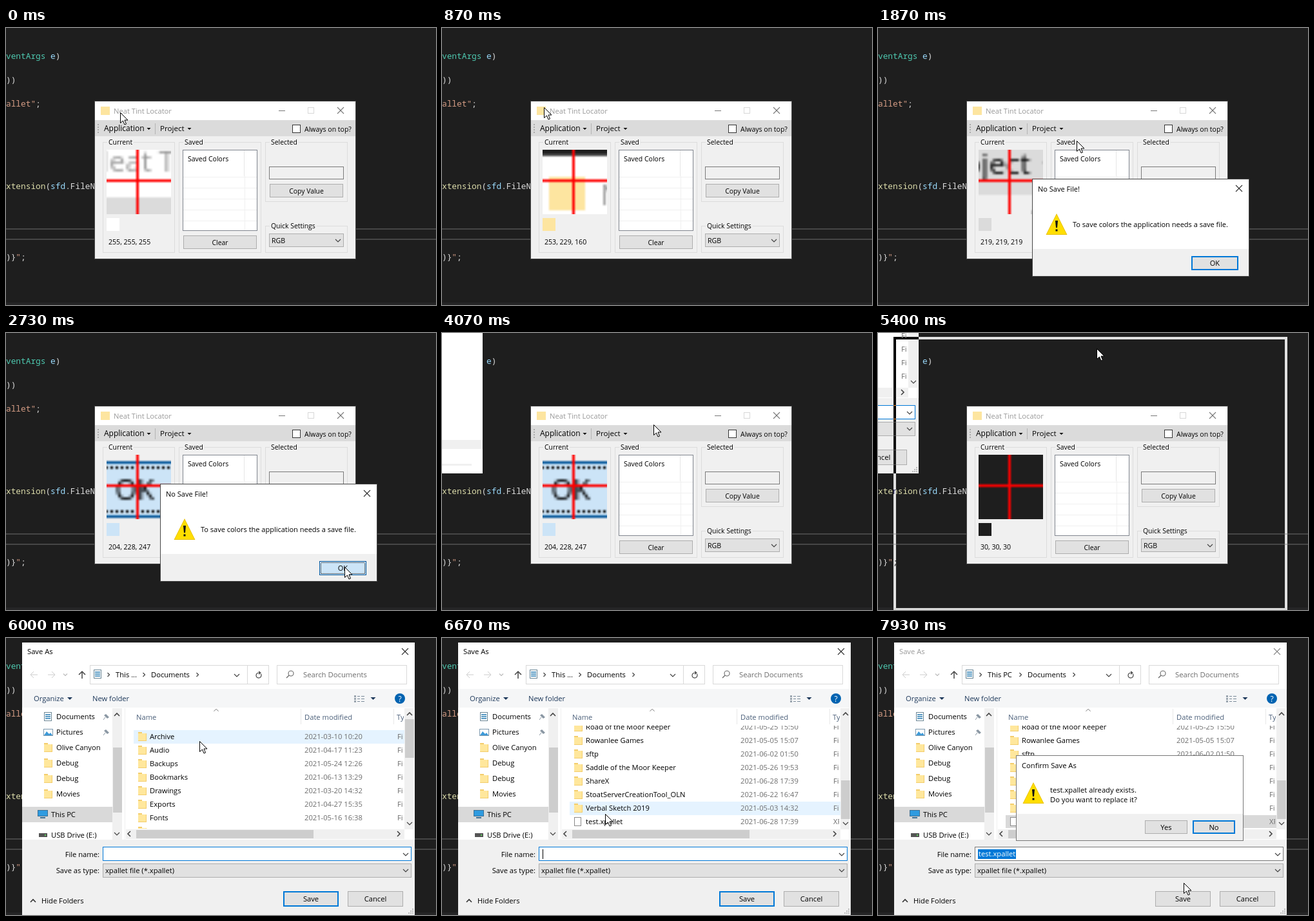
An HTML page with a canvas that plays this animation: 667 by 430 pixels, repeating every 8000 ms.

```html
<!DOCTYPE html>
<html lang="en">
<head>
<meta charset="utf-8">
<title>Colour picker</title>
<style>
html, body { margin: 0; width: 100%; height: 100%; overflow: hidden; background: #1e1e1e; }
canvas { display: block; }
</style>
</head>
<body>
<canvas id="stage" width="667" height="430"></canvas>
<script>
const LOOP = 8000;
const main = document.getElementById('stage').getContext('2d');
const buffer = document.createElement('canvas');
buffer.width = buffer.height = 27;
const probe = buffer.getContext('2d', { willReadFrequently: true });
let g = main;

const UI = '"Open Sans", "Noto Sans", sans-serif';
const MONO = '"Noto Sans Mono", "DejaVu Sans Mono", monospace';
const BLUE = '#0078d7', PANEL = '#f0f0f0', GREY = '#e1e1e1', EDGE = '#adadad';

// Pointer path: time, x, y
const path = [
  [-70, 188, 136], [0, 177, 131], [70, 177, 131], [200, 165, 124], [400, 165, 124],
  [500, 160, 123], [670, 160, 123], [800, 158, 123], [1600, 158, 123], [2000, 380, 200],
  [2350, 526, 355], [2470, 526, 355], [2660, 525, 363], [3450, 525, 363], [4070, 328, 142],
  [4200, 294, 123], [4265, 294, 123], [4320, -232, -188], [4870, -232, -188], [5330, 339, 24],
  [5660, 339, 24], [6000, 300, 160], [6200, 300, 160], [6600, 253, 273], [6720, 253, 273],
  [7000, 262, 284], [7070, 262, 284], [7400, 474, 408], [7660, 474, 408], [7930, 474, 380]
];

function pointer(t) {
  const i = path.findIndex(k => k[0] > t);
  if (i < 0) return path[path.length - 1].slice(1);
  if (i === 0) return path[0].slice(1);
  const [a, b] = [path[i - 1], path[i]];
  const p = (t - a[0]) / (b[0] - a[0]);
  return [a[1] + (b[1] - a[1]) * p, a[2] + (b[2] - a[2]) * p];
}

function box(x, y, w, h, fill, edge, lw = 1) {
  if (fill) { g.fillStyle = fill; g.fillRect(x, y, w, h); }
  if (edge) {
    g.strokeStyle = edge; g.lineWidth = lw;
    g.strokeRect(x + lw / 2, y + lw / 2, w - lw, h - lw);
  }
}

function text(s, x, y, size = 11.2, color = '#000', align = 'left', font = UI) {
  g.font = `${size}px ${font}`;
  g.fillStyle = color;
  g.textAlign = align;
  g.fillText(s, x, y);
}

function line(pts, color, w = 1) {
  g.beginPath();
  for (let i = 0; i < pts.length; i += 2) g.lineTo(pts[i], pts[i + 1]);
  g.strokeStyle = color; g.lineWidth = w;
  g.stroke();
}

function shape(pts, color) {
  g.beginPath();
  for (let i = 0; i < pts.length; i += 2) g.lineTo(pts[i], pts[i + 1]);
  g.closePath();
  g.fillStyle = color;
  g.fill();
}

function clipped(x, y, w, h, draw) {
  g.save();
  g.beginPath(); g.rect(x, y, w, h); g.clip();
  draw();
  g.restore();
}

const down = (x, y, r = 4, c = '#444') => line([x - r, y - r / 2, x, y + r / 2, x + r, y - r / 2], c, 1.2);
const up = (x, y, r = 4, c = '#444', w = 1.2) => line([x - r, y + r / 2, x, y - r / 2, x + r, y + r / 2], c, w);
const right = (x, y, r = 3, c = '#444', w = 1.2) => line([x - r / 2, y - r, x + r / 2, y, x - r / 2, y + r], c, w);
const left = (x, y) => line([x + 2, y - 4, x - 2, y, x + 2, y + 4], '#444', 1.6);
const drop = (x, y, r, c) => shape([x - r, y - r / 2, x + r, y - r / 2, x, y + r / 2], c);

function cross(x, y, c = '#333') {
  line([x - 5, y - 5, x + 5, y + 5], c, 1.1);
  line([x + 5, y - 5, x - 5, y + 5], c, 1.1);
}

function button(s, x, y, w, h, { fill = GREY, edge = EDGE, lw = 1, size = 11.2 } = {}) {
  box(x, y, w, h, fill, edge, lw);
  text(s, x + w / 2, y + h / 2 + 4, size, '#000', 'center');
}

function warning(x, y) {
  shape([x + 16, y, x + 32.5, y + 33, x - .5, y + 33], '#e8c000');
  shape([x + 16, y + 2, x + 31, y + 32, x + 1, y + 32], '#ffde00');
  shape([x + 14, y + 11, x + 18, y + 11, x + 17, y + 22, x + 15, y + 22], '#111');
  box(x + 14.5, y + 24.5, 3, 3, '#111');
}

function editor() {
  box(-900, -700, 2400, 1800, '#1e1e1e');
  const W = '#dcdcdc', V = '#9cdcfe', S = '#d69d85';
  const rows = [
    [48, 'ventArgs', '#4ec9b0', ' e', V, ')', W],
    [85, '))', W],
    [122, 'allet"', S, ';', W],
    [250, 'xtension', '#dcdcaa', '(', W, 'sfd', V, '.FileN', W],
    [360, ')}', W, '"', S, ';', W]
  ];
  for (const [y, ...parts] of rows) {
    let x = 0;
    for (let i = 0; i < parts.length; i += 2) {
      text(parts[i], x, y, 12.8, parts[i + 1], 'left', MONO);
      x += g.measureText(parts[i]).width;
    }
  }
  box(0, 311, 667, 2, '#464646');
  box(0, 327, 667, 2, '#464646');
  box(0, 426, 667, 4, '#252526');
}

function group(s, x, y, w, h) {
  box(x, y, w, h, null, '#dcdcdc');
  g.font = `10.4px ${UI}`;
  box(x + 7, y - 4, g.measureText(s).width + 4, 9, PANEL);
  text(s, x + 9, y + 4, 10.4);
}

function picker(lens) {
  box(137, 113, 406, 246, PANEL, '#484848');
  box(138, 114, 404, 29, '#fff');
  box(138, 143, 404, 25, '#dbdbdb');
  box(147, 122, 14, 13, '#fde5a0');
  text('Neat Tint Locator', 167, 133, 11.2, '#999');
  line([423, 128.5, 433, 128.5], '#777');
  box(468, 123, 10, 10, null, '#d8d8d8');
  cross(519, 128, '#777');

  for (let y = 149; y < 165; y += 4) box(142, y, 2, 2, '#aaa');
  text('Application', 152, 160, 12);
  drop(221.5, 156.5, 3, '#000');
  line([231.5, 148, 231.5, 165], '#b4b4b4');
  text('Project', 239, 160, 11.6);
  drop(284.5, 156.5, 3, '#000');
  box(444, 150, 13, 13, '#fff', '#333');
  text('Always on top?', 463, 161, 10.5);

  group('Current', 150, 177, 112, 172);
  group('Saved', 268, 177, 128, 172);
  group('Selected', 402, 177, 128, 93);
  group('Quick Settings', 402, 307, 128, 42);

  box(156, 189, 100, 100, '#fff');
  if (lens) {
    clipped(156, 189, 100, 100, () => g.drawImage(buffer, 154, 187, 108, 108));
    box(156, 295, 20, 20, `rgb(${lens})`);
    text(lens.join(', '), 159, 336, 10.6);
  }

  box(274, 189, 116, 126, '#fff', '#828790');
  for (let y = 231; y < 310; y += 17) box(275, y, 114, 1, '#f0f0f0');
  box(369, 190, 1, 40, '#e5e5e5');
  box(370, 230, 1, 84, '#f0f0f0');
  text('Saved Colors', 282, 207, 10.5);
  button('Clear', 275, 322, 114, 21, { size: 10.4 });
  box(408, 215, 116, 20, PANEL, '#7a7a7a');
  button('Copy Value', 409, 242, 114, 21, { size: 10.4 });
  box(408, 319, 116, 21, GREY, EDGE);
  text('RGB', 412, 334, 10.6);
  down(515, 330);
}

function message(t) {
  box(240, 235, 335, 150, '#fff');
  box(240, 343, 335, 42, PANEL);
  box(239, 234, 337, 152, null, '#484848');
  text('No Save File!', 248, 254, 11);
  cross(560, 249);
  warning(261, 288);
  text('To save colors the application needs a save file.', 302, 309, 11);
  const pressed = t >= 2600, hover = t >= 2330;
  box(486, 354, 73, 22, pressed ? '#cce4f7' : hover ? '#e5f1fb' : GREY,
    pressed ? '#005499' : BLUE, hover ? 1 : 2);
  if (pressed) {
    for (let x = 489; x < 557; x += 2) {
      box(x, 356, 1, 1, '#000');
      box(x, 373, 1, 1, '#000');
    }
    for (let y = 358; y < 373; y += 2) {
      box(488, y, 1, 1, '#000');
      box(556, y, 1, 1, '#000');
    }
  }
  text('OK', 514.8, 369, 11);
}

function folder(x, y) {
  box(x, y - 7, 6, 3, '#f3cd6c');
  box(x, y - 5, 13, 12, '#ffe79c');
  box(x + 12, y - 5, 1, 12, '#f3cd6c');
  box(x, y + 6, 13, 1, '#f3cd6c');
}

function page(x, y) {
  box(x, y - 7, 11, 14, '#fff', '#8a8a8a');
}

function doc(x, y) {
  box(x, y - 7, 12, 14, '#fff', '#6b8796');
  for (let i = -4; i < 5; i += 3) box(x + 2, y + i, 8, 2, '#5c9cc5');
}

const older = ['Archive', 'Audio', 'Backups', 'Bookmarks', 'Drawings', 'Exports', 'Fonts',
  'Invoices', 'Letters', 'Notes', 'Projects', 'Recordings'];
const files = [
  ...older.map((name, i) => [name, `2021-0${3 + i % 4}-${10 + i * 7 % 18} 1${i % 9}:${20 + i * 3}`]),
  ['Road of the Moor Keeper', '2021-05-25 15:50'],
  ['Rowanlee Games', '2021-05-05 15:07'],
  ['sftp', '2021-06-02 01:50'],
  ['Saddle of the Moor Keeper', '2021-05-26 19:53'],
  ['ShareX', '2021-06-28 17:39'],
  ['StoatServerCreationTool_OLN', '2021-06-22 16:47'],
  ['Verbal Sketch 2019', '2021-05-03 14:32'],
  ['test.xpallet', '2021-06-28 17:39']
];

function fileList(t) {
  const notches = Math.max(0, Math.min(5, Math.floor((t - 6200) / 66)));
  const scroll = Math.min(267, notches * 63);
  const [cx, cy] = pointer(t);
  const inside = t > 5660 && t < 7600 && cx > 196 && cx < 618 && cy > 136 && cy < 296;
  up(326, 112, 3.5, '#777', 1);
  text('Name', 202, 127, 11.2, '#4c607a');
  text('Date modified', 463, 127, 11.2, '#4c607a');
  clipped(600, 110, 17, 24, () => text('Type', 606, 127, 11.2, '#4c607a'));
  for (const x of [457, 601]) box(x, 110, 1, 24, '#e8e8e8');
  clipped(186, 136, 432, 160, () => files.forEach(([name, date], i) => {
    const y = 153 + i * 21 - scroll, last = i === files.length - 1;
    const hot = inside && Math.abs(cy - y) <= 10.5;
    if (last && t >= 7000) box(198, y - 10, 420, 20, t < 7670 ? '#cce8ff' : '#d9d9d9');
    else if (hot) box(198, y - 10, 420, 21, '#e5f3ff');
    if (last) page(205, y); else folder(205, y);
    text(name, 223, y + 4);
    text(date, 463, y + 4, 11.2, '#6d6d6d');
    clipped(600, y - 10, 16, 21, () =>
      text(last ? 'XPALLET' : 'File folder', 607, y + 4, 11.2, '#6d6d6d'));
  }));
  box(618, 109, 15, 188, PANEL);
  up(626, 118, 4, '#444', 1.6);
  down(626, 288);
  box(619, 126 + scroll / 267 * 95, 14, 60, '#cdcdcd');
  box(186, 297, 432, 15, PANEL);
  left(191, 304);
  right(609, 304, 4, '#444', 1.6);
  box(202, 298, 275, 13, '#cdcdcd');
}

function tree() {
  clipped(25, 109, 140, 204, () => {
    doc(59, 122);
    text('Documents', 78, 126);
    box(58, 141, 15, 11, '#fff', '#7a97ad');
    shape([59, 151, 63, 145, 67, 149, 69, 147, 72, 151], '#3d9ad8');
    text('Pictures', 78, 150);
    ['Olive Canyon', 'Debug', 'Debug', 'Movies'].forEach((s, i) => {
      folder(59, 170 + i * 24);
      text(s, 78, 174 + i * 24);
    });
    for (const y of [122, 146]) {
      shape([155, y - 4, 160, y + 1, 157, y + 3, 152, y - 2], '#8a97a3');
      line([154, y + 1, 151, y + 5], '#8a97a3');
    }
    box(25, 262, 140, 24, '#d9d9d9');
    box(49, 267, 16, 10, '#2f9be0', '#3c6f94');
    box(53, 278, 8, 2, '#3c6f94');
    text('This PC', 70, 278);
    box(51, 303, 13, 6, '#555');
    box(60, 305, 2, 2, '#5fd35f');
    text('USB Drive (E:)', 70, 310);
  });
  box(165, 109, 15, 204, PANEL);
  up(172, 119, 4, '#444', 1.6);
  down(172, 304);
  box(166, 170, 14, 101, '#cdcdcd');
  box(184, 109, 1, 204, '#f0f0f0');
}

function saveTop(t) {
  const idle = t >= 7600;
  text('Save As', 33, 25, 11.2, idle ? '#999' : '#000');
  cross(619, 21, idle ? '#888' : '#333');
  line([49, 57, 38, 57], '#ccc');
  line([43, 52, 38, 57, 43, 62], '#ccc');
  line([65, 57, 76, 57], '#ccc');
  line([71, 52, 76, 57, 71, 62], '#ccc');
  down(92, 57, 3, '#bbb');
  line([118, 63, 118, 52], '#444', 1.5);
  line([113, 57, 118, 52, 123, 57], '#444', 1.5);
  box(130, 42, 278, 30, '#fff', '#d9d9d9');
  box(374, 42, 1, 30, '#d9d9d9');
  doc(136, 56);
  const shift = idle ? 7 : 0;
  right(159, 57);
  text(idle ? 'This PC' : 'This ...', 170, 61);
  right(214 + shift, 57);
  text('Documents', 225 + shift, 61);
  right(297 + shift, 57);
  down(358, 58);
  g.beginPath();
  g.arc(392, 58, 4, -.6, 4.6);
  g.strokeStyle = '#555'; g.lineWidth = 1.3; g.stroke();
  shape([392, 51, 396, 54, 392, 57], '#555');
  box(420, 42, 202, 30, '#fff', '#d9d9d9');
  g.beginPath();
  g.arc(442, 55, 4, 0, 7);
  g.strokeStyle = '#666'; g.lineWidth = 1.1; g.stroke();
  line([439, 58, 435, 62], '#666', 1.2);
  text('Search Documents', 461, 61, 11.3, '#6d6d6d');

  box(25, 79, 609, 29, '#f5f6f7');
  text('Organize', 43, 98, 11.2, '#1e395b');
  drop(99, 94, 4, '#1e395b');
  text('New folder', 134, 98, 11.2, '#1e395b');
  for (let y = 89; y < 100; y += 4) {
    box(540, y, 3, 3, '#9aa5af');
    box(545, y + 1, 4, 1, '#7a8a99');
    box(551, y + 1, 5, 1, '#7a8a99');
  }
  drop(569.5, 94, 4, '#1e395b');
  g.beginPath();
  g.arc(611, 94, 8, 0, 7);
  g.fillStyle = '#0063b1'; g.fill();
  text('?', 611, 98.5, 12, '#fff', 'center');
  tree();
  fileList(t);
}

function saveForm(t) {
  const picked = t >= 7070, idle = t >= 7670;
  text('File name:', 145, 340, 11.2, '#000', 'right');
  box(150, 324, 479, 22, '#fff', picked ? '#7a7a7a' : BLUE);
  if (idle) box(155, 328, 59, 15, BLUE);
  if (picked) text('test.xpallet', 156, 339, 11.2, idle ? '#fff' : '#000');
  else if (Math.floor(t / 530) % 2 === 0) box(156, 328, 1, 15, '#000');
  down(620, 336);
  text('Save as type:', 145, 365, 11.2, '#000', 'right');
  box(150, 350, 479, 22, GREY, EDGE);
  text('xpallet file (*.xpallet)', 154, 365);
  down(620, 361);
  up(42, 408, 4, '#333', 1.6);
  text('Hide Folders', 55, 412);
  const hover = t > 7380 && !idle;
  button('Save', 430, 393, 86, 24,
    { fill: hover ? '#e5f1fb' : GREY, edge: idle ? EDGE : BLUE, lw: idle ? 1 : 2 });
  button('Cancel', 530, 393, 86, 24);
  for (let i = 0; i < 3; i++)
    for (let j = 0; j <= i; j++) box(630 - 3 * j, 420 + 3 * i, 2, 2, '#bbb');
}

function saveDialog(t) {
  const ready = t >= 4470;
  box(25, 7, 609, 423, '#fff');
  if (t < 4270) {
    box(25, 378, 609, 52, PANEL);
    box(25, 392, 592, 23, '#fff');
    box(25, 418, 592, 10, '#fff');
    box(617, 378, 17, 52, '#fff');
    box(617, 378, 17, 14, PANEL);
    return;
  }
  box(25, 313, 609, 117, PANEL);
  clipped(25, 7, 609, ready ? 423 : 342, () => { saveTop(t); saveForm(t); });
}

function confirmBox() {
  box(214, 182, 353, 133, '#fff', '#777');
  box(215, 273, 351, 41, PANEL);
  text('Confirm Save As', 223, 202);
  warning(225, 224);
  text('test.xpallet already exists.', 267, 240);
  text('Do you want to replace it?', 267, 255);
  button('Yes', 414, 283, 66, 21);
  button('No', 488, 283, 66, 21, { edge: BLUE, lw: 2 });
}

function scene(t, lens) {
  editor();
  picker(lens);
  if (t >= 1330 && t < 3400) message(t);
  if (t >= 3870) {
    g.save();
    if (t < 5600) g.translate(-571, -212);
    saveDialog(t);
    g.restore();
  }
  if (t >= 4870 && t < 5600) {
    const [x, y] = pointer(t);
    g.globalCompositeOperation = 'difference';
    g.strokeStyle = '#fff'; g.lineWidth = 4;
    g.strokeRect(Math.round(x) - 313, Math.round(y) - 16, 607, 421);
    g.globalCompositeOperation = 'source-over';
  }
  if (t >= 7670) confirmBox();
}

// Copies the pixels around the pointer and returns the middle colour.
function sample(t) {
  const [x, y] = pointer(t).map(Math.round);
  g = probe;
  g.setTransform(1, 0, 0, 1, 14 - x, 12 - y);
  scene(t, null);
  g.setTransform(1, 0, 0, 1, 0, 0);
  const rgb = [...g.getImageData(12, 12, 1, 1).data.slice(0, 3)];
  box(12, 0, 1, 27, '#f00');
  box(0, 12, 27, 1, '#f00');
  g = main;
  return rgb;
}

function arrow(x, y) {
  g.save();
  g.translate(Math.round(x) + .5, Math.round(y) + .5);
  const pts = [0, 0, 0, 16, 4, 12.5, 6.5, 18.5, 9, 17.5, 6.5, 11.5, 11.5, 11.5];
  shape(pts, '#fff');
  line([...pts, 0, 0], '#000');
  g.restore();
}

const start = performance.now();
function frame() {
  const t = (performance.now() - start) % LOOP;
  // The lens trails the pointer and freezes while the save dialog loads.
  const seen = t > 2800 && t < 4470 ? 2730 : t - 70;
  scene(t, sample(seen));
  arrow(...pointer(t));
  requestAnimationFrame(frame);
}
frame();
</script>
</body>
</html>
```
